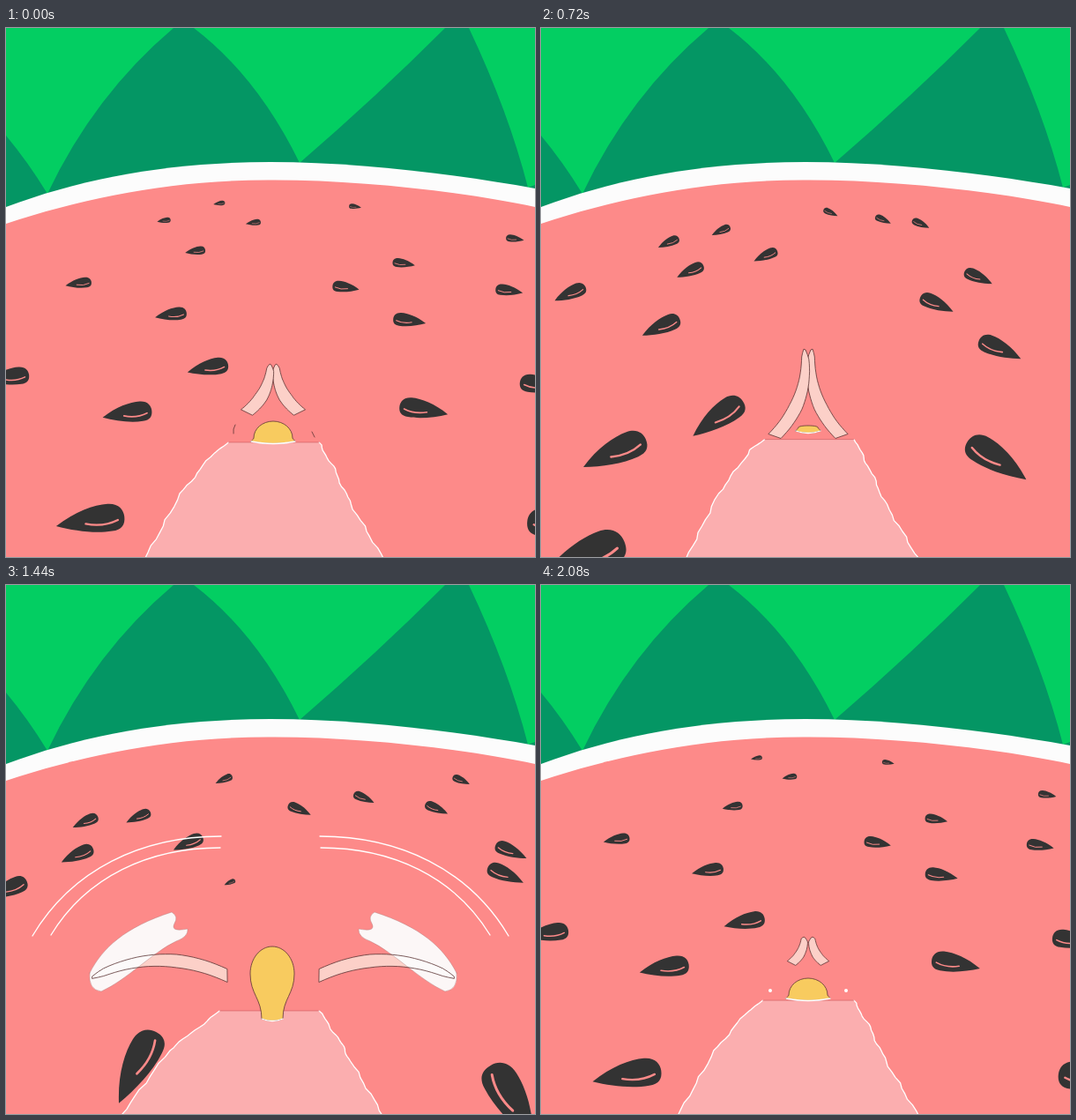
These frames come from a looping animation (600 px wide and 600 px high, 2.12 s). An HTML page:

```html
<!DOCTYPE html>
<html lang="en">
<head>
<meta charset="utf-8">
<title>Watermelon swim</title>
<style>
  html, body { margin: 0; width: 100%; height: 100%; overflow: hidden; background: #fd8a89; }
  svg { display: block; width: 100vw; height: 100vh; }
  path { stroke-linejoin: round; stroke-linecap: round; }
  .line { fill: none; stroke: #5b3434; stroke-width: .8; }
  .white { fill: none; stroke: #fff; stroke-width: 1.3; }
</style>
</head>
<body>
<svg viewBox="0 0 600 600">
  <defs>
    <g id="seed">
      <path fill="#333" d="M50,2 C20,-16 -8,-22 -28,-21 C-44,-20 -50,-10 -50,0 C-50,12 -44,19 -30,19 C-5,20 25,12 50,2Z"/>
      <path fill="none" stroke="#fd8a89" stroke-width="3" d="M-40,4 Q-18,12 7,4"/>
    </g>
    <g id="waves">
      <path id="outer" class="white"/>
      <path id="inner" class="white"/>
    </g>
    <g id="side">
      <path id="arm" fill="#fcd0c8"/>
      <path id="foam" fill="#fcfcfc" fill-opacity=".96" stroke="#a77" stroke-width=".4"
        d="M0,-6 C-14,-34 -40,-58 -93,-75 Q-101,-70 -96,-62 Q-91,-52 -111,-56 Q-112,-47 -98,-42 C-72,-30 -42,2 -13,15 Q2,13 0,-6Z"/>
      <path id="armLine" class="line"/>
      <circle id="drop" cx="43" cy="460" r="2" fill="#fff"/>
    </g>
  </defs>

  <rect width="600" height="260" fill="#03ce62"/>
  <path fill="#049664" d="M0,122 Q25,152 47,188 Q100,76 190,0 H213 Q285,55 333,153 Q420,78 498,0 H525 Q570,95 592,181 L600,178 V240 H0Z"/>
  <path fill="#fcfcfc" d="M0,203 C90,169 190,152 300,152 C400,152 510,166 600,182 V300 H0Z"/>
  <path fill="#fd8a89" d="M0,222 C90,192 190,172 300,172.500 C400,172 520,186 600,203 V600 H0Z"/>

  <g id="seeds"></g>
  <use href="#waves" transform="translate(300)"/>
  <use href="#waves" transform="translate(300) scale(-1,1)"/>

  <path id="dress" fill="#fbaeaf"/>
  <path id="leftHem" class="white"/>
  <path id="rightHem" class="white"/>
  <path id="neckline" fill="none" stroke="#d9686c" stroke-width=".8"/>
  <path id="straps" class="line" d="M258,460 Q257,455 260,450 M350,464 L347,458"/>
  <path id="head" fill="#f8cb5f" stroke="#5b3434" stroke-width=".8"/>
  <path id="collar" class="white"/>
  <path id="creases" class="line" d="M281,446 L289,448 M289,457 Q300,459 313,457"/>
  <use href="#side" transform="translate(303)"/>
  <use href="#side" transform="translate(303) scale(-1,1)"/>
</svg>
<script>
const LOOP = 2120, STEP = 40, TAU = 2 * Math.PI;
const BEATS = [0, 440, 720, 1160, 1440, 1600, 2080, LOOP];
const $ = id => document.getElementById(id);
const draw = (id, d) => $(id).setAttribute('d', d);
const show = (id, on) => { $(id).style.display = on ? '' : 'none'; };
const mix = (a, b, u) => a + (b - a) * u;
const clamp = u => Math.min(1, Math.max(0, u));
const ramp = (from, to, t) => clamp((t - from) / (to - from));
const poly = points => 'M' + points.map(p => p.map(v => v.toFixed(1)).join()).join('L');

// Value at position p along a list, one unit per entry.
function sample(list, p) {
  const i = Math.min(Math.floor(p), list.length - 2);
  return mix(list[i], list[i + 1], p - i);
}

function beatAt(t) {
  let i = 0;
  while (t >= BEATS[i + 1]) i++;
  return i + ramp(BEATS[i], BEATS[i + 1], t);
}

// Drifting seeds: birth and life in loops, then start, halfway point and end.
const seeds = [];
function seed(birth, life, start, half, end, turn = 0) {
  const bend = half.map((h, i) => 2 * h - (start[i] + end[i]) / 2);
  const nodes = [0, 1, 2].map(() => {
    const node = document.createElementNS('http://www.w3.org/2000/svg', 'use');
    node.setAttribute('href', '#seed');
    return $('seeds').appendChild(node);
  });
  seeds.push({ birth, life, start, bend, end, turn, nodes });
}
seed(.91, 1.54, [254, 187], [138, 269], [-4, 306]);
seed(-.06, .96, [186, 212], [121, 256], [35, 283]);
seed(.91, .8, [287, 206], [249, 264], [189, 300]);
seed(.69, .96, [190, 299], [159, 335], [-20, 345]);
seed(.91, 1.26, [386, 197], [476, 247], [612, 320]);
seed(.4, .77, [487, 214], [543, 229], [606, 248]);
seed(.4, 1.5, [247, 204], [191, 266], [-20, 333]);
seed(.2, 1.5, [332, 200], [376, 290], [605, 331]);
seed(.2, 1.5, [387, 213], [444, 264], [597, 307]);
seed(.69, .92, [422, 288], [490, 351], [650, 400]);
seed(.6, 1.13, [254, 337], [212, 419], [126, 592], 55);
seed(.91, .7, [146, 425], [84, 481], [-55, 560]);
seed(.7, 1.06, [424, 387], [512, 482], [600, 640], 60);
seed(.91, .6, [102, 548], [60, 592], [-40, 660]);
seed(.91, .2, [15, 395], [-1, 397], [-45, 410]);
seed(.91, .25, [600, 398], [614, 408], [650, 420]);
seed(.65, .52, [560, 498], [611, 546], [670, 600]);

function drawSeeds(s) {
  const drift = s - .05 * (1 - Math.cos(TAU * s)), lift = Math.sin(TAU / 2 * s);
  for (const { birth, life, start, bend, end, turn, nodes } of seeds) {
    nodes.forEach((node, lap) => {
      const age = drift + lap - birth, u = age / life;
      const on = u >= 0 && u < 1;
      node.style.display = on ? '' : 'none';
      if (!on) return;
      const [x, y] = start.map((a, i) => mix(mix(a, bend[i], u), mix(bend[i], end[i], u), u));
      const flip = x < 303 ? -1 : 1, tilt = 7 + 18 * lift + turn * u ** 3;
      const grow = clamp(.2 + age * 12), size = grow * (11 + .17 * (y - 190)) * (1.06 + .25 * lift) / 100;
      node.setAttribute('transform', `translate(${x},${y}) scale(${flip},1) rotate(${tilt}) scale(${size})`);
    });
  }
}

function ruffle(points, phase) {
  const out = [points[0]];
  for (let i = 1; i < points.length; i++) {
    const [a, b] = [points[i - 1], points[i]];
    for (let j = 1; j <= 10; j++) {
      const y = mix(a[1], b[1], j / 10), wave = 1.2 * Math.sin(y * .2 + phase) + .6 * Math.sin(y * .47);
      out.push([mix(a[0], b[0], j / 10) + wave, y]);
    }
  }
  return out;
}

function drawDress(s) {
  const sink = .5 - .5 * Math.cos(TAU * (s - .2)), y = 463 + 20 * sink, phase = TAU * 2 * s;
  const left = ruffle([[172 - 42 * sink, 602], [205 - 20 * sink, 528], [240 - 13 * sink, y + 12], [257 - 14 * sink, y]], phase);
  const right = ruffle([[355, y], [370 + 6 * sink, y + 30], [391, 540], [428, 602]], phase + 2);
  const [a, b] = [left.at(-1), right[0]];
  draw('dress', poly([...left, ...right]) + 'Z');
  draw('leftHem', poly(left));
  draw('rightHem', poly(right));
  draw('neckline', poly([a, b]));
}

// The head ducks, rises out of the collar, then narrows to a neck.
function drawHead(t) {
  const surface = ramp(720, 1160, t), leave = ramp(1600, 2080, t);
  const duck = ramp(0, 440, t) - surface, up = surface - leave, pinch = ramp(1160, 1440, t) - leave;
  const x = 303 - pinch, w = mix(mix(22, 11, duck), 25, up), b = w + 3 - 16 * pinch;
  const top = mix(mix(446, 451, duck), 418, up) - 8 * pinch;
  const base = mix(mix(469, 457, duck), 488, up) + 4 * pinch;
  const mid = mix(base - 4, 448, up) - 7 * pinch;
  const h = (base - mid) * .45, r = (mid - top) * .56;
  const bottom = `${x + b},${base} Q${x},${base + 5} ${x - b},${base}`;
  draw('head', `M${x - b},${base} C${x - b},${base - h} ${x - w},${mid + h} ${x - w},${mid}
    C${x - w},${mid - r} ${x - w * .55},${top} ${x},${top} C${x + w * .55},${top} ${x + w},${mid - r} ${x + w},${mid}
    C${x + w},${mid + h} ${x + b},${base - h} ${bottom}Z`);
  draw('collar', 'M' + bottom);
}

// Hand and shoulder at each beat, measured from the middle.
const hand = { x: [3, 7, 4, 136, 205, 84, 4, 3], y: [382, 365, 365, 382, 445, 477, 400, 382] };
const shoulder = { x: [30, 42, 38, 45, 52, 52, 19, 30], y: [436, 463, 463, 453, 443, 467, 429, 436] };

// A tapered limb bowed away from its chord.
function drawArm(beat) {
  const at = joint => [sample(joint.x, beat), sample(joint.y, beat)];
  const [hx, hy] = at(hand), [sx, sy] = at(shoulder);
  const dx = sx - hx, dy = sy - hy, length = Math.hypot(dx, dy), nx = -dy / length, ny = dx / length;
  const width = Math.min(15, 6 + .14 * length), edges = [[], []];
  for (let i = 0; i <= 24; i++) {
    const u = i / 24, bow = .48 * length * u * (1 - u);
    const half = mix(8, width, clamp(u * 1.6)) / 2 * Math.sqrt(clamp(.1 + u * 10));
    edges.forEach((edge, n) => {
      const off = bow + (n ? half : -half);
      edge.push([hx + dx * u + nx * off, hy + dy * u + ny * off]);
    });
  }
  const d = poly([...edges[0], ...edges[1].reverse()]) + 'Z';
  draw('arm', d);
  draw('armLine', d);
}

// Foam swept along by the hands, and ripples spreading ahead.
function drawPush(beat, t) {
  const on = t >= 960 && t < 1760;
  ['foam', 'waves'].forEach(id => show(id, on));
  if (!on) return;
  const p = 2 * clamp((beat - 3) / 2), along = (...stops) => sample(stops, p);
  const fade = ramp(960, 1160, t) * (1 - ramp(1600, 1760, t));
  const size = fade * (1 - .45 * ramp(1440, 1600, t));
  $('foam').setAttribute('transform',
    `translate(${along(138, 208, 207)},${along(386, 446, 472)}) rotate(${along(-29, 0, 15)}) scale(${size})`);
  $('waves').setAttribute('opacity', fade);

  const ripple = (id, x0, y0, x1, y1) => {
    const w = x0 - x1, h = y0 - y1;
    draw(id, `M${x0},${y0} C${x0 - w * .21},${y0 - h * .67} ${x0 - w * .58},${y1} ${x1},${y1}`);
  };
  const x = along(153, 270, 290), y = along(365, 398, 387), top = along(339, 285, 270);
  ripple('outer', x, y, along(0, 56, 122), top);
  ripple('inner', x - 21, y - 1, along(63, 57, 122), top + 13);
}

function render(now) {
  const step = Math.floor(now % LOOP / STEP) * STEP, t = step < 80 ? 0 : step;
  const s = t / LOOP, beat = beatAt(t);
  drawSeeds(s);
  drawDress(s);
  drawHead(t);
  drawArm(beat);
  drawPush(beat, t);
  show('drop', t >= 2000);
  show('straps', t < 120);
  show('creases', t >= 1080 && t < 1240);
}

const began = performance.now();
function tick() {
  render(performance.now() - began);
  requestAnimationFrame(tick);
}
tick();
</script>
</body>
</html>
```
